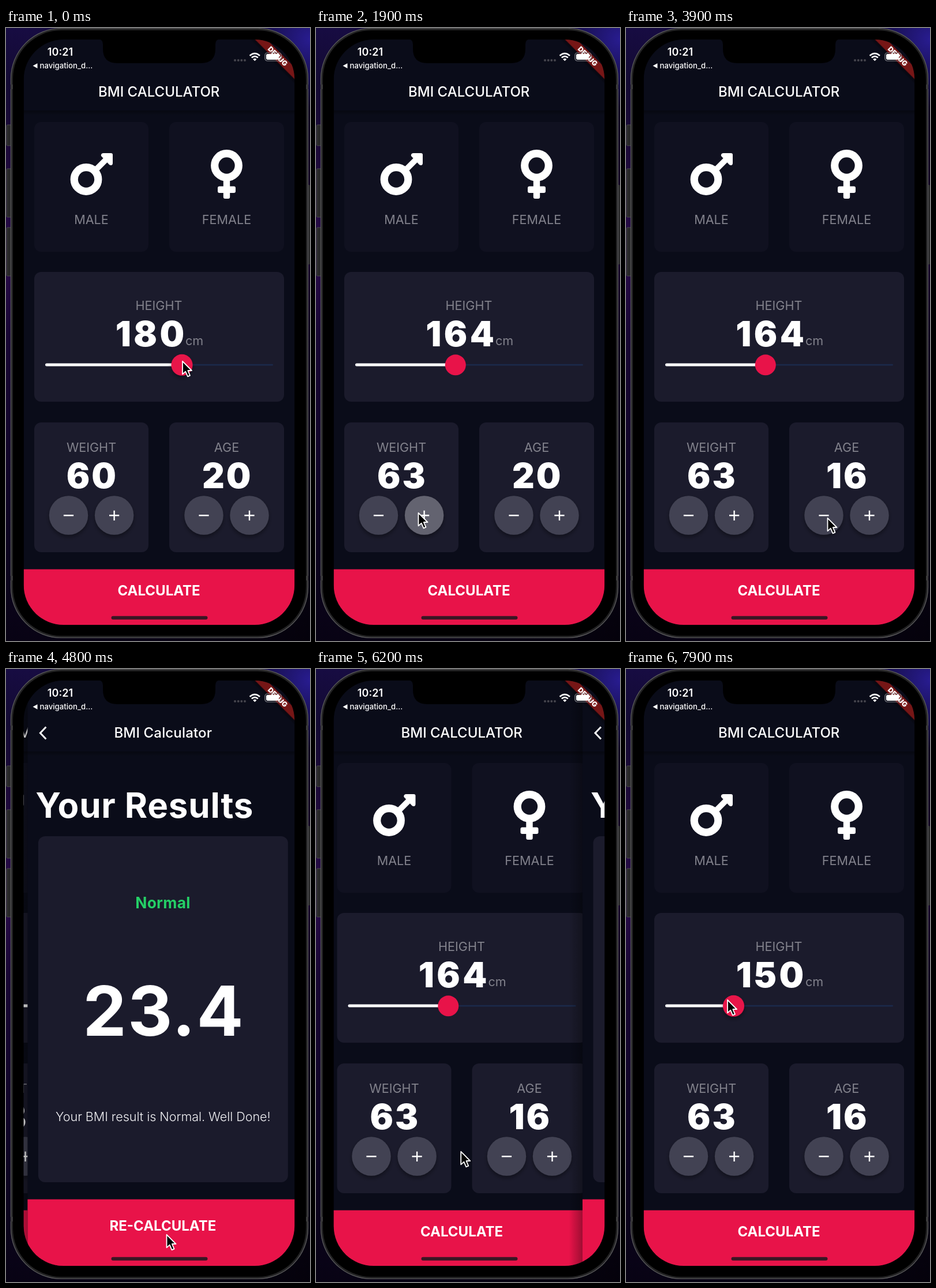
An HTML page that plays this animation: 527 by 1063 pixels, repeating every 8000 ms.

```html
<!DOCTYPE html>
<html lang="en">
<head>
<meta charset="utf-8">
<title>BMI Calculator</title>
<style>
  html, body { margin: 0; width: 100%; height: 100%; overflow: hidden; background: #000; }
  svg { display: block; width: 100vw; height: 100vh; }
  text { font-family: Inter, "Liberation Sans", sans-serif; white-space: pre; }
</style>
</head>
<body>
<svg id="stage" viewBox="0 0 527 1063" preserveAspectRatio="none"></svg>
<script>
const LOOP = 8000, STEP = 100;
const BG = '#0a0c19', CARD = '#1b1b2c', IDLE = '#101120', PINK = '#e81349', GREY = '#82828c';
const BUTTON = '#424352', LIT = '#64646f';

const rect = (x, y, w, h, r, fill, more = '') =>
  `<rect x="${x}" y="${y}" width="${w}" height="${h}" rx="${r}" fill="${fill}" ${more}/>`;
const text = (x, y, s, size, weight = 400, fill = '#fff', more = 'text-anchor="middle"') =>
  `<text x="${x}" y="${y}" font-size="${size}" font-weight="${weight}" fill="${fill}" ${more}>${s}</text>`;
// Centred text with tracking; the trailing gap is taken out of the centring.
const spaced = (x, y, s, size, weight, gap, fill = '#fff', more = '') =>
  text(x + gap / 2, y, s, size, weight, fill, `text-anchor="middle" letter-spacing="${gap}" ${more}`);
const label = (x, y, s) => text(x, y, s, 21.6, 400, GREY);
const line = (d, width, more = '') =>
  `<path d="${d}" fill="none" stroke="#fff" stroke-width="${width}" ${more}/>`;
const stop = (at, color, alpha = 1) =>
  `<stop offset="${at}" stop-color="${color}" stop-opacity="${alpha}"/>`;

function roundButton(x, plus, id = '') {
  return `<circle cx="${x}" cy="845" r="33.7" fill="${BUTTON}" filter="url(#lift)" ${id && `id="${id}"`}/>` +
    line(`M${x - 8.6} 845.3h17.2` + (plus ? `M${x} 836.7v17.2` : ''), 2.4);
}

const defs = `<defs>
  <linearGradient id="desk" x2="0" y2="1">
    ${stop(0, '#170c42')}${stop(.09, '#130a32')}${stop(.2, '#1c0938')}${stop(.38, '#280a49')}
    ${stop(.5, '#180633')}${stop(.75, '#0f0426')}${stop(1, '#080314')}
  </linearGradient>
  <linearGradient id="dusk">${stop(.5, '#000', 0)}${stop(1, '#000', .45)}</linearGradient>
  <radialGradient id="glow" gradientUnits="userSpaceOnUse" cx="527" cy="20" r="120">
    ${stop(0, '#281c90')}${stop(1, '#281c90', 0)}
  </radialGradient>
  <linearGradient id="edge">${stop(0, '#000', 0)}${stop(1, '#000', .32)}</linearGradient>
  <linearGradient id="under" x2="0" y2="1">${stop(0, '#000', .35)}${stop(1, '#000', 0)}</linearGradient>
  <filter id="lift" x="-30%" y="-30%" width="160%" height="170%">
    <feDropShadow dx="0" dy="4" stdDeviation="3.5" flood-color="#000" flood-opacity=".38"/>
  </filter>
  <clipPath id="screen">${rect(30.7, 20, 469.5, 1015, 69, '#fff')}</clipPath>
</defs>`;

const phone =
  ['desk', 'dusk', 'glow'].map(id => rect(0, 0, 527, 1063, 0, `url(#${id})`)).join('') +
  [[168, 36], [244, 84], [346, 84]].map(([y, h]) =>
    rect(1, y, 9, h, 1.5, '#29292a', 'stroke="#48484a" stroke-width="1"')).join('') +
  rect(521, 272, 6, 138, 1.5, '#29292a') +
  rect(8, 0, 516, 1058, 88, '#242425') +
  rect(8.5, .5, 515, 1057, 87.5, 'none', 'stroke="#5c5c5e" stroke-width="1.2"') +
  [98, 950].map(y => rect(8, y, 4, 8, 0, '#39393a') + rect(520, y, 4, 8, 0, '#39393a')).join('') +
  rect(12, 4, 508, 1050, 84, '#000');

const page = rect(30.5, 20, 470, 1015, 0, BG) + rect(30.5, 143, 470, 8, 0, 'url(#under)');
const footer = (y, base, s) =>
  rect(30.5, y, 470, 1035 - y, 0, PINK) + text(265, base, s, 24, 700);

const maleIcon =
  '<circle cx="139" cy="262.5" r="20.8" fill="none" stroke="#fff" stroke-width="13.2"/>' +
  line('M156 245.5L177 224.5', 10) +
  '<path d="M168 217h14q3 0 3 3v14q0 4-3 4-2 0-3-1l-14-15q-1-4 3-5z" fill="#fff"/>';
const femaleIcon =
  '<circle cx="382.5" cy="238.5" r="20.8" fill="none" stroke="#fff" stroke-width="13.2"/>' +
  rect(376.8, 262, 11.4, 34, 3, '#fff') + rect(367, 274.5, 31, 11.6, 3, '#fff');

const bigNumber = (x, y, id, gap) => spaced(x, y, '', 60, 900, gap, '#fff', `id="${id}"`);

const mainPage = `<g id="main">${page}` +
  text(265.2, 119, 'BMI CALCULATOR', 24, 500) +
  rect(49, 163, 198, 225, 12, IDLE) + rect(283, 163, 199, 225, 12, IDLE) +
  maleIcon + femaleIcon +
  label(148, 340, 'MALE') + label(382.5, 340, 'FEMALE') +
  rect(49, 423, 433, 225, 12, CARD) +
  label(265, 489, 'HEIGHT') + bigNumber(249.5, 552, 'height', 4.5) +
  text(311, 550, 'cm', 21.6, 400, GREY, '') +
  rect(68, 582.8, 395, 2.8, 1.4, '#1b2949') +
  rect(68, 581.6, 0, 5, 2.5, '#fff', 'id="track"') +
  `<circle id="thumb" cy="584.3" r="18" fill="${PINK}"/>` +
  rect(49, 684, 198, 225, 12, CARD) + rect(283, 684, 199, 225, 12, CARD) +
  label(148, 735, 'WEIGHT') + bigNumber(147.8, 798, 'weight', 3) +
  label(382.5, 735, 'AGE') + bigNumber(382.3, 798, 'age', 3) +
  roundButton(108.5, false) + roundButton(187.6, true, 'more') +
  roundButton(343, false, 'less') + roundButton(422, true) +
  footer(938.6, 984, 'CALCULATE') + '</g>';

const resultPage = `<g id="result">${rect(7, 20, 24, 1015, 0, 'url(#edge)')}${page}` +
  line('M62.5 100.5L52.5 111L62.5 121.5', 3) +
  spaced(265.3, 119, 'BMI Calculator', 24, 500, .15) +
  text(44.5, 258, 'Your Results', 60, 700, '#fff', 'letter-spacing=".85"') +
  rect(49, 290, 433, 600, 12, CARD) +
  spaced(265, 415, 'Normal', 26.4, 700, .3, '#24cf66') +
  spaced(265.5, 636, '23.4', 120, 700, 2.2) +
  spaced(265.5, 784, 'Your BMI result is Normal. Well Done!', 21.6, 300, -.05, '#f2f2f5') +
  footer(919.6, 974, 'RE-CALCULATE') + '</g>';

const overlay =
  `<g transform="translate(471 49) rotate(45)">` +
  rect(-60, -7.2, 120, 14.4, 0, '#761719', 'filter="url(#lift)"') +
  text(0, 4.4, 'DEBUG', 12.2, 900) + '</g>' +
  rect(449, 43, 28, 14, 4, 'none', 'stroke="#8a8a90" stroke-width="1.2"') +
  rect(451, 45, 22, 10, 2.4, '#fff') +
  [397, 402.7, 408.3, 414].map(x => `<circle cx="${x}" cy="56" r="2" fill="#45454d"/>`).join('') +
  line('M422.6 48Q431.3 40.2 440 48M425.8 51.6Q431.3 46.6 436.8 51.6', 2.7) +
  '<path d="M428.2 54.2Q431.3 51.5 434.4 54.2L431.3 57.3z" fill="#fff"/>';

const status =
  '<path d="M160 19H371Q363 20 363 28V36Q363 61 338 61H193Q168 61 168 36V28Q168 20 160 19z" fill="#000"/>' +
  text(94, 48.3, '10:21', 18.1, 600) +
  '<path d="M54.5 61.3V70L46.5 65.6z" fill="#fff"/>' +
  text(58.5, 70, 'navigation_d...', 13.2, 500, '#fff', '') +
  rect(182.5, 1019.8, 167, 6, 3, '#3a1624');

const cursor = '<path id="cursor" d="M.5 .8v22.5l5.2-4.7l3.8 8.8l4-1.8l-3.7-8.6h6.7z" ' +
  'fill="#000" stroke="#fff" stroke-width="1.8" stroke-linejoin="round"/>';

const $ = id => document.getElementById(id);
$('stage').innerHTML = defs + phone +
  `<g clip-path="url(#screen)">${mainPage}${resultPage}${overlay}</g>` + status + cursor;

// Each row: time, then values.
const cursorPath = [
  [0, 305.5, 577], [100, 304.5, 577], [200, 304.5, 577], [700, 241, 577], [800, 241, 577],
  [1200, 177, 840], [1900, 177, 840], [2500, 349, 849], [3900, 349, 849],
  [4300, 278, 980], [4800, 278, 980], [5400, 251, 961], [6000, 251, 961],
  [6400, 250.5, 711], [6900, 241, 575], [7100, 241, 575], [7900, 175.5, 573]
];
const heightPath = [[0, 180], [200, 180], [700, 164], [7100, 164], [7900, 150]];
const weightTaps = [1300, 1600, 1900];
const ageTaps = [2700, 3000, 3300, 3600];
const PUSH = 4490, POP = 6000, SLIDE = 400;

const smooth = k => k * k * (3 - 2 * k);
const linear = k => k;

function sample(path, t, ease) {
  let i = 1;
  while (i < path.length - 1 && path[i][0] < t) i++;
  const a = path[i - 1], b = path[i];
  const k = ease(Math.min(1, Math.max(0, (t - a[0]) / (b[0] - a[0]))));
  return a.slice(1).map((v, n) => v + (b[n + 1] - v) * k);
}

// Cubic Bezier (.35, .91, .33, .97): quick start, long settle.
function slideEase(x) {
  if (x <= 0) return 0;
  if (x >= 1) return 1;
  const at = (s, p, q) => 3 * (1 - s) ** 2 * s * p + 3 * (1 - s) * s * s * q + s ** 3;
  let lo = 0, hi = 1;
  for (let i = 0; i < 24; i++) {
    const mid = (lo + hi) / 2;
    if (at(mid, .35, .33) < x) lo = mid; else hi = mid;
  }
  return at(lo, .91, .97);
}

const count = (taps, t) => taps.filter(tap => t >= tap).length;
const lit = (taps, t) => taps.some(tap => t >= tap - 100 && t < tap + 100) ? LIT : BUTTON;

function draw(t) {
  const [cx, cy] = sample(cursorPath, t, smooth);
  $('cursor').setAttribute('transform', `translate(${cx} ${cy})`);

  const height = Math.round(sample(heightPath, t, linear)[0]);
  const x = 68 + (height - 120) * 3.95;
  $('height').textContent = height;
  $('track').setAttribute('width', x - 68);
  $('thumb').setAttribute('cx', x);
  const dragging = t <= 700 || t >= 7100;
  $('thumb').setAttribute('r', dragging ? 18.5 : 18);
  $('thumb').setAttribute('filter', dragging ? 'url(#lift)' : 'none');

  $('weight').textContent = 60 + count(weightTaps, t);
  $('age').textContent = 20 - count(ageTaps, t);
  $('more').setAttribute('fill', lit(weightTaps, t));
  $('less').setAttribute('fill', lit(ageTaps, t));

  const p = slideEase((t - PUSH) / SLIDE) - slideEase((t - POP) / SLIDE);
  $('main').setAttribute('transform', `translate(${-469 / 3 * p} 0)`);
  $('result').setAttribute('transform', `translate(${469 * (1 - p)} 0)`);
  $('result').setAttribute('visibility', p > 0 ? 'visible' : 'hidden');
}

const start = performance.now();
function tick() {
  const t = (performance.now() - start) % LOOP;
  draw(Math.floor(t / STEP) * STEP);
  requestAnimationFrame(tick);
}
draw(0);
requestAnimationFrame(tick);
</script>
</body>
</html>
```
